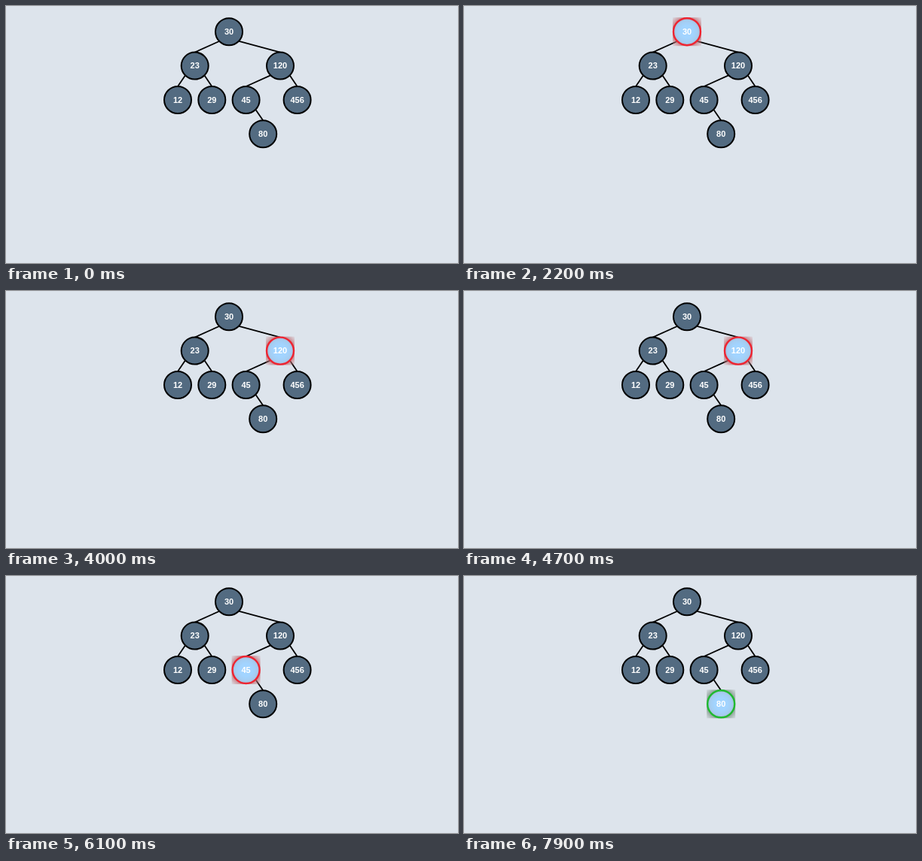
These frames come from a looping animation (600x342 px, 8 s). An HTML page:

```html
<!DOCTYPE html>
<html lang="en">
<head>
<meta charset="utf-8">
<title>Tree search</title>
<style>
html, body { margin: 0; width: 100%; height: 100%; overflow: hidden; background: #dde4ec; }
svg { display: block; }
line { stroke: #000; stroke-width: 1.8; }
.ring { fill: #536b81; stroke: #000; stroke-width: 2; }
.glow { display: none; }
text { font: bold 11px "Liberation Sans", Arial, sans-serif; fill: #fff; text-anchor: middle; }
.on .glow { display: inline; }
.on .ring { fill: url(#lit); stroke: #ee2431; stroke-width: 2.4; }
.on.found .ring { stroke: #1fba2f; }
</style>
</head>
<body>
<svg width="600" height="342" viewBox="0 0 600 342">
  <defs>
    <radialGradient id="lit">
      <stop offset=".45" stop-color="#a2d4ff"/>
      <stop offset=".8" stop-color="#a4cdf2"/>
      <stop offset="1" stop-color="#a9bcd5"/>
    </radialGradient>
    <radialGradient id="red" gradientUnits="userSpaceOnUse" cx="0" cy="0" r="27">
      <stop offset=".68" stop-color="#c2656b" stop-opacity=".75"/>
      <stop offset="1" stop-color="#c2858a" stop-opacity=".08"/>
    </radialGradient>
    <radialGradient id="green" gradientUnits="userSpaceOnUse" cx="0" cy="0" r="27">
      <stop offset=".68" stop-color="#6f8a78" stop-opacity=".75"/>
      <stop offset="1" stop-color="#8a9a92" stop-opacity=".12"/>
    </radialGradient>
  </defs>
  <g id="edges"></g>
  <g id="nodes"></g>
</svg>
<script>
// value, x, y, parent index
const tree = [
  [30, 296, 34.2],
  [23, 250.7, 79.6, 0],
  [120, 364, 79.6, 0],
  [12, 228, 125, 1],
  [29, 273.3, 125, 1],
  [45, 318.6, 125, 2],
  [456, 386.6, 125, 2],
  [80, 341.2, 170.3, 5]
];
const path = [0, 2, 5, 7];
const target = path[path.length - 1];
const LOOP = 8000, FIRST = 1800, STEP = 2000, HOLD = 1000;

function add(parent, tag, attrs) {
  const el = document.createElementNS("http://www.w3.org/2000/svg", tag);
  for (const key in attrs) el.setAttribute(key, attrs[key]);
  return parent.appendChild(el);
}

const edgeLayer = document.getElementById("edges");
const nodeLayer = document.getElementById("nodes");

const nodes = tree.map(([value, x, y, up], i) => {
  if (up !== undefined) {
    const [, px, py] = tree[up];
    add(edgeLayer, "line", { x1: px + 12.5 * Math.sign(x - px), y1: py + 12.5, x2: x, y2: y - 18 });
  }
  const found = i === target;
  const node = add(nodeLayer, "g", { transform: `translate(${x} ${y})` });
  node.classList.toggle("found", found);
  add(node, "rect", {
    class: "glow", x: -19, y: -19, width: 38, height: 38,
    fill: `url(#${found ? "green" : "red"})`
  });
  add(node, "circle", { class: "ring", r: 18 });
  add(node, "text", { y: 3.8 }).textContent = value;
  return node;
});

function draw(now) {
  const t = now % LOOP - FIRST;
  const lit = t >= 0 && t % STEP < HOLD ? path[Math.floor(t / STEP)] : -1;
  nodes.forEach((node, i) => node.classList.toggle("on", i === lit));
  requestAnimationFrame(draw);
}
draw(0);
</script>
</body>
</html>
```
